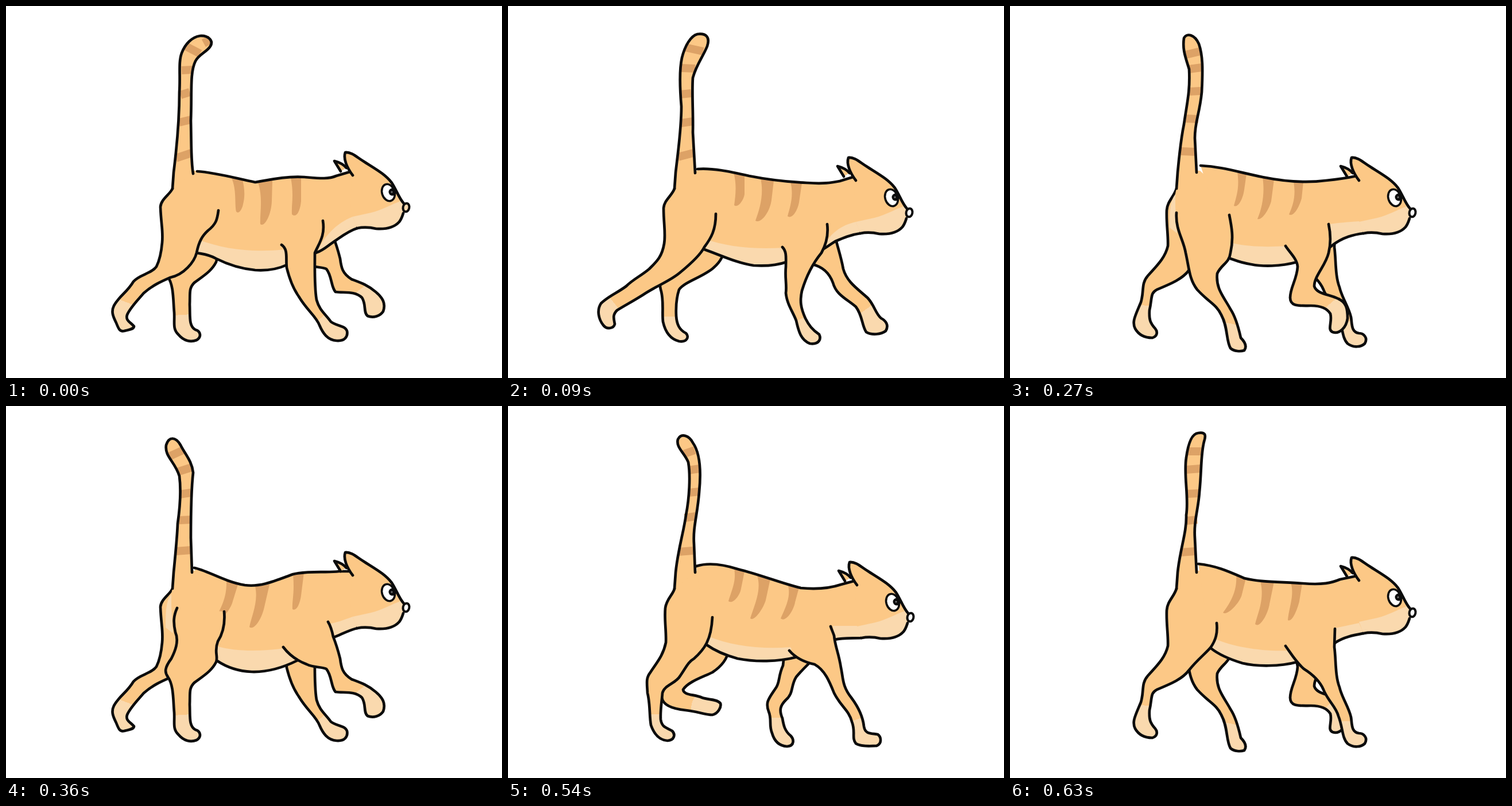
An HTML page without scripts for the animation above (0.72 s loop, 864 by 648 pixels).

```html
<!DOCTYPE html>
<html lang="en">
<head>
<meta charset="utf-8">
<title>Walking cat</title>
<style>
html, body { margin: 0; width: 100%; height: 100%; overflow: hidden; background: #fff; }
svg { display: block; width: 100%; height: 100%; color: #fff; }
.step { fill: #fcc886; visibility: hidden; animation: show 720ms step-end infinite; animation-delay: calc(var(--i) * 90ms - 720ms); }
.line, .leg { stroke: #0c0c0c; stroke-width: 4.7; stroke-linecap: round; stroke-linejoin: round; }
.line { fill: none; }
.light { fill: #fad9ae; }
.dark { fill: #dda266; }
.band { fill: none; stroke: #dda266; stroke-width: 14; }
@keyframes show { 0% { visibility: visible; } 12.5%, 100% { visibility: hidden; } }
</style>
</head>
<body>
<svg viewBox="0 0 864 648">
<defs>
<linearGradient id="paw" gradientUnits="userSpaceOnUse"><stop offset=".5" stop-color="#fcc886"/><stop offset=".5" stop-color="#fad9ae"/></linearGradient>
<linearGradient id="pa1" href="#paw" x1="208" y1="505" x2="201" y2="523"/>
<linearGradient id="pa2" href="#paw" x1="306" y1="530" x2="307" y2="546"/>
<linearGradient id="pa3" href="#paw" x1="543" y1="538" x2="553" y2="550"/>
<linearGradient id="pa4" href="#paw" x1="612" y1="487" x2="622" y2="500"/>
<linearGradient id="pb1" href="#paw" x1="192" y1="512" x2="178" y2="523"/>
<linearGradient id="pb2" href="#paw" x1="281" y1="534" x2="281" y2="548"/>
<linearGradient id="pb3" href="#paw" x1="505" y1="539" x2="511" y2="553"/>
<linearGradient id="pb4" href="#paw" x1="615" y1="524" x2="625" y2="538"/>
<linearGradient id="pc1" href="#paw" x1="257" y1="530" x2="257" y2="544"/>
<radialGradient id="pc2" gradientUnits="userSpaceOnUse" cx="357" cy="528" r="38"><stop offset="1" stop-color="#fad9ae"/><stop offset="1" stop-color="#fcc886"/></radialGradient>
<linearGradient id="pc3" href="#paw" x1="467" y1="536" x2="467" y2="549"/>
<linearGradient id="pc4" href="#paw" x1="605" y1="537" x2="611" y2="555"/>
<linearGradient id="pd1" href="#paw" x1="235" y1="515" x2="234" y2="528"/>
<linearGradient id="pd2" href="#paw" x1="385" y1="546" x2="382" y2="560"/>
<linearGradient id="pd3" href="#paw" x1="551" y1="512" x2="563" y2="526"/>
<linearGradient id="pd4" href="#paw" x1="584" y1="542" x2="585" y2="556"/>

<!-- Legs per pose: 1 and 2 hind, 3 and 4 front -->
<path id="a1" class="leg" fill="url(#pa1)" d="M290 318C286 328 270 336 269 350C270 380 274 392 272 412C270 436 266 446 262 454C254 466 232 468 222 480C210 500 198 504 188 522C183 532 186 540 192 552C196 562 198 568 206 566C212 564 222 564 223 558C216 550 208 548 211 538C216 526 228 514 240 500C256 486 270 480 286 473C310 468 328 446 332 430C336 410 342 400 352 391C366 380 368 372 370 356"/>
<path id="a2" class="leg" fill="url(#pa2)" d="M298 352C292 365 291 376 295 394C302 410 294 428 288 440C276 456 276 464 282 472C292 486 291 510 293 534C294 552 290 562 300 572C310 584 322 586 332 582C342 576 338 566 330 564C318 558 321 540 320 520C321 500 318 492 328 482C344 470 358 462 366 446C370 436 362 428 369 410C378 396 382 380 380 358"/>
<path id="a3" class="leg" fill="url(#pa3)" d="M480 416C492 424 487 440 489 456C494 476 500 492 510 506C524 530 540 540 546 556C552 570 560 582 576 583C590 584 596 576 594 566C590 556 576 558 566 550C556 536 546 530 541 512C537 490 538 460 538 430C546 412 556 400 552 374"/>
<path id="a4" class="leg" fill="url(#pa4)" d="M483 420C495 436 508 444 524 450C536 456 550 454 558 458C568 470 566 490 574 498C590 500 608 496 620 508C628 520 622 534 630 540C640 544 652 540 657 532C662 518 656 508 644 498C630 486 618 482 602 476C586 466 584 456 582 440C578 424 574 412 570 402C568 392 566 384 561 376"/>
<path id="b1" class="leg" fill="url(#pb1)" d="M290 318C286 330 272 338 271 352C271 380 275 396 272 414C268 438 258 446 246 458C232 470 218 476 206 488C190 500 174 506 162 518C154 530 158 546 166 556C172 564 184 562 186 554C184 544 182 538 190 530C206 520 222 512 240 500C262 486 284 478 300 464C322 446 336 432 342 420C354 404 362 390 362 362"/>
<path id="b2" class="leg" fill="url(#pb2)" d="M292 352C288 366 288 390 294 404C300 424 292 440 284 452C268 466 262 478 266 494C272 512 268 534 270 550C274 568 282 580 298 584C312 586 316 576 310 570C298 564 294 554 293 540C292 520 294 506 298 494C308 480 340 472 358 456C372 444 376 432 378 420C388 396 382 376 381 362"/>
<path id="b3" class="leg" fill="url(#pb3)" d="M478 420C486 428 484 440 484 454C482 474 486 486 484 500C486 520 496 532 502 548C506 566 510 582 526 588C542 590 546 580 542 572C530 564 524 556 518 544C510 526 508 514 512 496C518 476 528 452 546 430C556 412 558 396 556 380"/>
<path id="b4" class="leg" fill="url(#pb4)" d="M486 422C498 436 512 446 530 450C548 454 560 466 566 482C572 504 590 510 606 524C618 540 616 556 624 568C634 574 650 572 658 566C664 556 658 548 650 544C640 536 638 520 626 508C608 492 590 480 584 458C580 436 574 420 570 402C568 392 566 386 562 380"/>
<path id="c1" class="leg" fill="url(#pc1)" d="M290 318C288 328 276 336 274 352C272 372 276 392 275 412C270 436 258 448 248 464C240 474 242 482 243 500C248 520 246 540 249 556C254 570 262 582 278 583C290 582 292 572 286 566C276 560 268 560 266 546C265 530 268 514 269 500C272 486 292 484 300 470C312 452 314 446 324 440C342 424 354 408 356 368"/>
<path id="c2" class="leg" fill="url(#pc2)" d="M283 345C282 362 284 390 291 406C298 428 296 444 288 456C276 474 264 486 268 508C270 522 290 528 310 530C330 532 344 538 356 538C366 536 372 524 370 518C364 510 348 512 338 508C324 502 306 504 305 494C314 480 340 472 356 464C374 452 382 440 384 426C390 400 384 380 382 366"/>
<path id="c3" class="leg" fill="url(#pc3)" d="M476 424C482 434 480 442 479 452C470 472 474 482 466 492C454 510 448 516 454 532C460 546 454 556 460 570C464 584 472 592 486 593C500 592 498 580 492 574C482 566 480 556 478 544C472 530 474 522 484 512C498 500 492 488 502 472C520 450 548 430 556 406C560 398 558 392 560 388"/>
<path id="c4" class="leg" fill="url(#pc4)" d="M490 426C500 438 516 446 534 450C552 460 560 480 568 500C580 524 594 530 599 550C606 568 598 578 606 588C616 594 632 592 642 592C652 588 650 576 644 572C632 570 622 572 620 558C618 540 610 524 598 508C582 488 584 474 580 456C576 430 570 420 568 400C566 394 564 390 562 384"/>
<path id="d1" class="leg" fill="url(#pd1)" d="M290 318C286 332 274 340 273 356C272 380 276 400 275 418C270 440 254 454 240 470C228 484 234 496 228 516C218 540 212 550 218 562C226 576 240 578 248 578C256 576 258 568 253 562C244 552 242 546 243 530C248 508 244 500 256 494C280 484 300 476 312 460C326 442 342 430 350 420C358 408 362 396 360 378"/>
<path id="d2" class="leg" fill="url(#pd2)" d="M290 360C288 390 302 406 306 430C312 456 312 476 326 494C346 516 360 520 368 538C380 560 376 582 384 596C390 602 402 602 408 600C414 592 408 584 402 578C398 560 392 540 384 528C372 506 358 492 361 466C368 450 382 448 384 430C390 404 386 384 382 364"/>
<path id="d3" class="leg" fill="url(#pd3)" d="M480 418C486 428 500 440 501 454C500 476 488 490 488 508C488 524 504 522 524 522C540 522 552 526 558 536C562 550 552 564 562 568C574 572 586 560 588 544C588 528 586 516 572 510C556 502 534 502 530 488C530 470 550 452 555 430C560 410 558 394 555 380"/>
<path id="d4" class="leg" fill="url(#pd4)" d="M480 418C490 432 498 446 512 458C528 468 540 480 546 494C554 514 568 524 572 540C580 560 578 578 588 588C598 596 612 594 618 588C624 578 616 570 608 570C594 568 596 554 594 542C590 524 578 508 574 490C566 470 568 440 565 420L566 388"/>

<path id="rump" d="M290 318L292 284 331 287 400 350 345 410 318 430 284 345Z"/>
<path id="sheen" class="light" d="M288 328C280 338 278 352 278 386L291 396 288 350Z"/>
<g id="head">
<path class="leg" d="M583 288L572 270C580 272 588 276 593 282"/>
<path d="M602 292C594 280 586 266 591 255C602 254 612 264 622 270C640 282 660 292 672 308C680 320 684 334 693 344L690 368C684 384 672 388 645 388C632 385 622 385 612 388L600 350Z"/>
<path class="light" d="M690 339C672 345 656 355 636 360L604 367 612 388C622 385 632 385 645 388C672 388 684 382 688 372L693 358Z"/>
<path class="line" d="M604 295C594 282 587 266 591 255C602 254 612 264 622 270C640 282 660 292 672 308C680 320 684 334 693 344M692 361C690 367 689 371 685 376C676 386 660 389 645 388C632 385 622 385 612 387"/>
<ellipse cx="666" cy="325" rx="11" ry="15" transform="rotate(-18 666 325)" fill="#fff" stroke="#0c0c0c" stroke-width="3.6"/>
<circle cx="673" cy="324" r="6.5" fill="#0c0c0c"/>
<circle cx="672" cy="324" r="1.6" fill="#777"/>
<path class="line" d="M674 317L681 325"/>
<ellipse cx="697" cy="351" rx="5.4" ry="7.4" transform="rotate(12 697 351)" fill="currentColor" stroke="#0c0c0c" stroke-width="4"/>
</g>
</defs>

<g class="step" style="--i:0">
<use href="#a2"/><use href="#a4"/><use href="#rump"/>
<path id="body0" d="M333 288C365 290 400 300 434 307C462 302 490 296 520 298C545 300 562 302 575 296L602 288 625 330 612 387C596 392 584 402 572 410C560 418 552 426 542 429L500 445 489 451C470 460 450 461 434 460C412 458 390 452 366 440C352 432 342 432 332 430"/>
<path class="light" d="M335 407C380 424 430 430 486 424L489 451C470 460 450 461 434 460C412 458 390 452 366 440L332 430ZM604 367C575 378 552 404 542 429C560 420 572 410 590 398L612 387Z"/>
<path class="dark" d="M393 300C402 320 398 345 401 358C406 364 412 352 413 345C417 330 415 315 412 303ZM439 307C448 335 442 360 443 380C450 386 462 365 463 340L464 304ZM496 299C502 330 497 345 498 363C505 369 512 360 514 340L514 298Z"/>
<use href="#body0" class="line"/><use href="#head" color="#fad9ae"/><use href="#a1"/><use href="#a3"/>
<path id="tail0" d="M290 318L292 290C297 250 302 200 302 150C304 120 300 98 306 82C312 66 324 54 338 52C352 51 362 60 356 70C350 80 336 84 330 96C320 116 324 150 322 200C323 240 322 270 326 292"/>
<path class="band" d="M313 70L338 83M306 112L325 111M304 155L320 150M301 203L322 198M296 265L323 256M347 55L354 68"/>
<use href="#tail0" class="line"/>
</g>

<g class="step" style="--i:1">
<use href="#b2"/><use href="#b4"/><use href="#rump"/>
<path id="body1" d="M330 284C356 282 385 288 420 296C450 302 480 306 520 308C550 310 562 308 578 305L604 297 628 340 614 396C598 398 584 404 570 410C560 416 556 420 548 424L520 440 485 446C465 453 445 453 428 452C400 448 375 436 342 424"/>
<path class="light" d="M342 405C380 420 430 424 480 421L485 446C465 453 445 453 428 452C400 448 375 436 342 424ZM606 376C580 382 560 396 546 425L570 410C584 404 598 398 614 396Z"/>
<path class="dark" d="M393 290C399 312 396 332 394 347C400 352 410 340 412 328L412 294ZM440 300C446 328 439 352 431 374C440 380 456 360 459 338L463 304ZM492 306C498 330 492 348 487 366C494 372 504 358 507 342L512 308Z"/>
<use href="#body1" class="line"/><use href="#head" x="2" y="9"/><use href="#b1"/><use href="#b3"/>
<path id="tail1" d="M290 318L292 290C296 255 302 215 302 175C299 140 298 112 303 90C308 70 318 52 330 49C346 47 352 55 347 70C340 88 328 102 322 125C320 150 323 190 322 220L326 291"/>
<path class="band" d="M308 72L340 79M302 108L326 109M300 154L319 152M301 204L322 201M296 263L323 256"/>
<use href="#tail1" class="line"/>
</g>

<g class="step" style="--i:2">
<use href="#c1"/><use href="#c4"/><use href="#rump"/><use href="#sheen"/>
<path id="body2" d="M328 282C345 272 365 272 385 272C410 274 430 284 452 295C480 306 500 314 530 315C560 316 570 314 606 304L630 350 616 404C600 402 584 408 572 407C562 412 558 416 553 418L520 440 480 441C460 446 440 446 424 444C408 442 396 440 384 434"/>
<path class="light" d="M386 411C420 418 450 418 478 420L480 441C460 446 440 446 424 444L384 434ZM608 382C590 382 575 384 558 390L553 418 572 407C584 408 600 402 616 404Z"/>
<path class="dark" d="M393 276C397 305 394 320 387 335C394 340 408 328 411 312L413 277ZM440 291C444 320 436 345 419 367C430 374 450 355 455 335L462 300ZM487 309C494 330 488 350 475 368C484 374 496 355 500 345L511 315Z"/>
<use href="#body2" class="line"/><use href="#head" x="4" y="17"/><use href="#c2"/><use href="#c3"/>
<path id="tail2" d="M290 318L292 290C294 262 302 230 302 200C296 160 294 130 300 98C304 76 310 54 322 47C334 44 342 52 338 72C332 100 318 120 318 160C326 190 322 200 323 230C324 260 322 275 326 290"/>
<path class="band" d="M306 73L337 76M299 105L327 107M297 153L317 153M301 205L322 204M296 262L323 256"/>
<use href="#tail2" class="line"/>
</g>

<g class="step" style="--i:3">
<use href="#d1"/><use href="#d4"/><use href="#rump"/><use href="#sheen"/>
<path id="body3" d="M332 278C370 280 400 290 440 298C480 306 520 308 550 304C570 302 585 300 604 296L630 345 616 396C600 398 580 402 560 418L530 440 500 446C470 454 440 454 420 450C405 448 395 444 384 440"/>
<path class="light" d="M386 413C420 420 450 420 484 418L500 446C470 454 440 454 420 450L384 440ZM608 375C590 376 570 378 556 380L558 418C580 402 600 398 616 396Z"/>
<path class="dark" d="M396 289C400 315 395 330 390 348C398 352 406 335 408 320L412 292ZM440 298C444 325 440 350 431 371C440 374 452 352 455 340L460 302ZM494 306C498 330 494 345 486 363C494 368 504 350 508 335L511 306Z"/>
<use href="#body3" class="line"/><use href="#head" x="4" y="9"/><use href="#d2"/><use href="#d3"/>
<path id="tail3" d="M290 318L292 290C295 260 297 235 303 206C308 170 314 150 312 110C306 90 300 76 303 56C308 46 322 50 329 66C336 86 336 110 334 150C330 190 322 200 322 230L325 290"/>
<path class="band" d="M306 85L331 79M312 110L334 107M312 149L333 148M305 196L328 197M298 253L322 254"/>
<use href="#tail3" class="line"/>
</g>

<g class="step" style="--i:4">
<use href="#a1"/><use href="#a3"/><use href="#rump"/><use href="#sheen"/>
<path id="body4" d="M328 282C350 286 380 306 416 312C444 316 470 304 500 293C530 286 560 291 580 288L602 288 625 330 612 387C598 390 584 398 571 403L560 420 508 443C490 452 460 464 428 463C404 462 386 456 368 444"/>
<path class="light" d="M366 418C400 428 440 428 486 422L508 443C490 452 460 464 428 463C404 462 386 456 368 444ZM604 367C590 372 575 378 560 380L571 403C584 398 598 390 612 387Z"/>
<path class="dark" d="M384 303C385 335 375 350 363 374C370 380 392 355 395 340L404 311ZM434 314C440 340 428 365 424 385C432 392 446 370 450 350L459 311ZM500 294C503 325 498 340 499 354C506 358 512 345 514 330L519 290Z"/>
<use href="#body4" class="line"/><use href="#head"/><use href="#a2"/><use href="#a4"/>
<path id="tail4" d="M290 318L292 290C295 260 298 230 299 205C304 170 305 145 302 122C294 96 276 88 279 68C284 52 296 54 304 68C312 84 324 96 326 116C322 150 322 200 322 230L324 290"/>
<path class="band" d="M284 88L308 77M298 115L323 107M302 154L322 151M301 199L323 198M296 253L322 251"/>
<use href="#tail4" class="line"/>
</g>

<g class="step" style="--i:5">
<use href="#b1"/><use href="#b3"/><use href="#rump"/><use href="#sheen"/>
<path id="body5" d="M328 280C350 278 378 292 408 298C440 304 480 306 510 306C545 306 565 304 580 300L604 297 628 340 614 396C598 398 584 402 570 405L560 428 508 441C480 452 440 454 415 452C398 450 388 446 376 438"/>
<path class="light" d="M378 413C410 424 450 424 488 421L508 441C480 452 440 454 415 452L376 438ZM606 376L562 382 570 405 614 396Z"/>
<path class="dark" d="M389 292C392 320 382 335 374 357C382 363 398 342 401 329L408 298ZM434 302C441 330 429 355 423 377C431 384 446 360 450 344L458 304ZM494 306C498 328 491 345 487 362C495 368 505 350 507 336L513 306Z"/>
<use href="#body5" class="line"/><use href="#head" x="2" y="9"/><use href="#b2"/><use href="#b4"/>
<path id="tail5" d="M290 318L292 290C296 255 302 225 304 198C310 165 312 130 308 110C301 90 284 80 287 62C293 50 306 52 313 66C324 84 331 105 330 132C327 165 322 205 323 235L325 290"/>
<path class="band" d="M293 87L317 77M306 113L329 108M309 152L328 150M305 197L325 195M297 253L322 252"/>
<use href="#tail5" class="line"/>
</g>

<g class="step" style="--i:6">
<use href="#c2"/><use href="#c3"/><use href="#rump"/>
<path id="body6" d="M328 279C350 272 375 276 400 284C440 294 480 310 510 317C540 320 565 316 580 311L606 304 630 350 616 404C600 405 585 403 569 407L560 430 504 437C470 446 430 446 400 440C378 434 360 426 346 416"/>
<path class="light" d="M348 401C390 418 440 424 492 420L503 437C470 446 430 446 400 440C378 434 360 426 346 416ZM608 383L566 383 569 407C585 403 600 405 616 404Z"/>
<path class="dark" d="M394 283C398 305 390 320 384 340C392 346 404 330 406 318L412 288ZM434 295C442 320 430 345 422 370C430 376 446 350 449 338L457 301ZM487 310C494 330 484 350 475 370C484 378 498 355 500 342L507 316Z"/>
<use href="#body6" class="line"/><use href="#head" x="4" y="17"/><use href="#c1"/><use href="#c4"/>
<path id="tail6" d="M290 318L292 290C296 250 306 220 310 190C316 160 318 120 314 98C308 82 292 72 296 58C302 46 316 52 322 64C336 84 336 120 333 150C330 190 322 210 324 240L326 290"/>
<path class="band" d="M305 84L325 77M314 112L334 109M315 151L334 149M308 195L327 192M297 254L322 252"/>
<use href="#tail6" class="line"/>
</g>

<g class="step" style="--i:7">
<use href="#d2"/><use href="#d3"/><use href="#rump"/>
<path id="body7" d="M328 275C360 278 385 290 408 300C440 308 480 306 510 309C545 312 560 308 575 302L604 296 630 345 616 396C600 399 582 402 567 412L550 430 500 446C470 454 430 454 405 448C385 442 365 434 350 422"/>
<path class="light" d="M358 406C390 420 440 428 484 426L500 446C470 454 430 454 405 448C385 442 365 434 350 422ZM608 378L566 387 567 412C582 402 600 399 616 396Z"/>
<path class="dark" d="M394 294C396 320 386 340 371 360C380 366 402 340 404 328L411 300ZM436 305C444 335 432 360 427 380C436 388 450 360 452 345L460 306ZM489 307C496 330 486 350 484 373C492 378 502 350 504 340L509 309Z"/>
<use href="#body7" class="line"/><use href="#head" x="4" y="9"/><use href="#d1"/><use href="#d4"/>
<path id="tail7" d="M290 318L292 290C296 250 308 220 307 190C312 160 302 120 307 90C310 68 316 48 328 47C340 45 342 50 338 62C332 86 334 110 330 150C328 180 320 200 322 230L325 290"/>
<path class="band" d="M309 79L334 79M306 111L332 109M309 153L330 152M307 200L326 198M297 255L323 253"/>
<use href="#tail7" class="line"/>
</g>
</svg>
</body>
</html>
```
